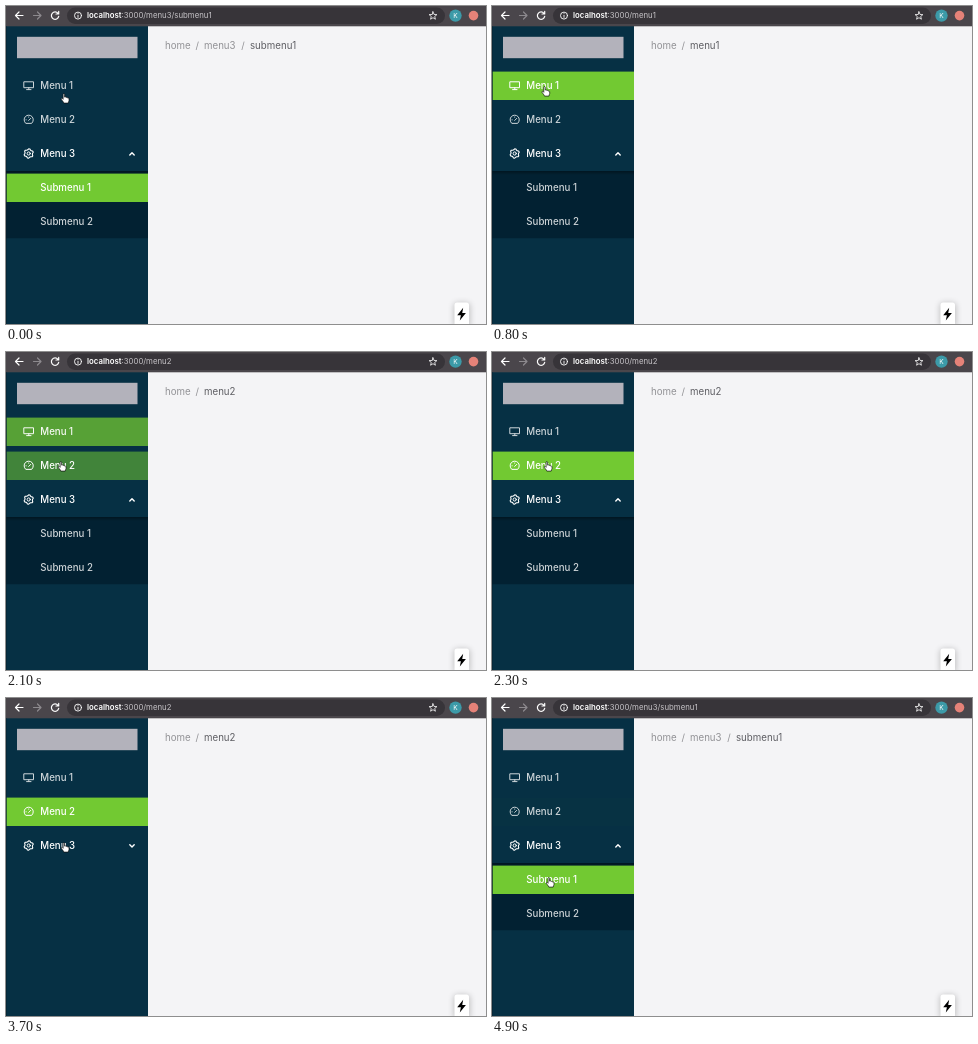
Recreate the animation shown at these times as an HTML page. Size 480 by 318 pixels, loop 5000 ms.

```html
<!DOCTYPE html>
<html lang="en">
<head>
<meta charset="utf-8">
<title>Sidebar menu</title>
<style>
  html, body { margin: 0; width: 100%; height: 100%; overflow: hidden; background: #f4f4f6; }
  svg { display: block; width: 100vw; height: 100vh; }
  text { font-family: Inter, Roboto, sans-serif; white-space: pre; }
  .item { font-size: 9.7px; font-weight: 500; fill: #fff; }
  .crumb { font-size: 9.7px; fill: #929296; }
  .url { font-size: 7.8px; fill: #c6c3c7; }
  .line { fill: none; stroke: #fff; stroke-linecap: round; stroke-linejoin: round; }
</style>
</head>
<body>
<svg viewBox="0 0 480 318">
  <defs>
    <linearGradient id="inset" x2="0" y2="1">
      <stop stop-color="#000" stop-opacity=".35"/>
      <stop offset="1" stop-color="#000" stop-opacity="0"/>
    </linearGradient>
    <filter id="soft" x="-100%" y="-100%" width="300%" height="300%"><feGaussianBlur stdDeviation="3"/></filter>
    <clipPath id="subClip"><rect id="subClipBox" y="165" width="142" height="67.5"/></clipPath>
  </defs>

  <rect width="480" height="318" fill="#f4f4f6"/>
  <rect y="20" width="142" height="298" fill="#063044"/>
  <rect x="11" y="30.8" width="120.5" height="21.4" fill="#b3b2bb"/>

  <!-- browser bar -->
  <rect width="480" height="20.3" fill="#4a464b"/>
  <rect x="61" y="1.5" width="378" height="16.5" rx="8.2" fill="#373439"/>
  <g class="line" stroke-width="1.2">
    <path d="M17 9.5H9.5M13 6L9.5 9.5L13 13"/>
    <path d="M27.5 9.5H35M31.5 6L35 9.5L31.5 13" style="stroke:#8d8a8e"/>
    <path d="M52 7.3A3.7 3.7 0 1 0 52.7 10.4M52.7 5.4V8H50"/>
    <circle cx="72" cy="9.6" r="3.5" stroke-width=".9"/>
    <path d="M72 9.4V11.4M72 7.7V7.8" stroke-width=".9"/>
    <path id="star" stroke-width=".8"/>
  </g>
  <text class="url" x="81" y="12.4"><tspan fill="#fff" font-weight="600">localhost</tspan><tspan id="path"></tspan></text>
  <circle cx="449.5" cy="9.6" r="6.2" fill="#3c9aa8"/>
  <text x="449.5" y="12" font-size="6.6" fill="#fff" text-anchor="middle">K</text>
  <circle cx="467.5" cy="9.6" r="4.8" fill="#e58278"/>

  <text class="crumb" y="43" id="crumbs"></text>

  <!-- sidebar -->
  <g id="top"></g>
  <g class="line">
    <path id="gear" stroke-width="1.1"/>
    <circle cx="22.7" cy="147.5" r="1.6" stroke-width="1"/>
    <path id="chevron" d="M-2.2 1.1L0 -1.1L2.2 1.1" stroke-width="1.4"/>
  </g>
  <text class="item" x="34.3" y="151" font-weight="600">Menu 3</text>
  <g clip-path="url(#subClip)" id="sub">
    <rect y="165" width="142" height="67.5" fill="#022132"/>
    <rect y="165" width="142" height="4" fill="url(#inset)"/>
    <g id="subItems"></g>
  </g>
  <rect y="20" width=".7" height="298" fill="#0a1f2b" opacity=".6"/>

  <!-- badge -->
  <rect x="448" y="297" width="16" height="24" rx="3" fill="#000" opacity=".22" filter="url(#soft)"/>
  <rect x="448.5" y="296.5" width="14.5" height="25" rx="2.5" fill="#fff"/>
  <path d="M457.2 301.8L451.2 309.3H454.9L453.8 314.6L459.9 307H456.2Z" fill="#000"/>

  <path id="hand" d="M-1.9 -4.2C-1.9 -5.1 -.5 -5.1 -.4 -4.2V-1.4C.2 -1.9 1.1 -1.6 1.2 -1C1.9 -1.4 2.6 -1 2.7 -.4C3.4 -.6 4 -.2 4 .5V2C4 3 3.2 3.3 3.2 4.6H-1.2C-1.5 3.3 -3 2 -3.7 .8C-4 .1 -3.2 -.5 -2.6 .1L-1.9 .8Z"
    fill="#fff" stroke="#111" stroke-width=".7" stroke-linejoin="round"/>
</svg>
<script>
const LOOP = 5000, STEP = 100, FADE = 300, GREEN = '#72c932';
// Clicks on Menu 1, Menu 2 and Submenu 1; a button lights up on press, just before release
const CLICK = [400, 1980, 4640], PRESS = 35;
const $ = id => document.getElementById(id);
const clamp = x => Math.min(1, Math.max(0, x));
const ease = x => x < .5 ? 4 * x ** 3 : 1 - 4 * (1 - x) ** 3;
const ramp = (t, start) => ease(clamp((t - start) / FADE));
const pulse = (t, on, off) => ramp(t, on) - ramp(t, off);

// Closed outline whose radius depends on the angle
function polar(cx, cy, count, radius) {
  const points = Array.from({ length: count }, (_, i) => {
    const a = i / count * 2 * Math.PI - Math.PI / 2, r = radius(i);
    return (cx + r * Math.cos(a)).toFixed(2) + ' ' + (cy + r * Math.sin(a)).toFixed(2);
  });
  return 'M' + points.join('L') + 'Z';
}
$('star').setAttribute('d', polar(427, 9.9, 10, i => i % 2 ? 1.8 : 4.1));
$('gear').setAttribute('d', polar(22.7, 147.5, 24, i => i % 4 < 2 ? 4.7 : 3.8));

const monitor = '<path d="M18.2 75.8H27.5V81.7H18.2ZM22.8 81.7V83.6M20.6 83.6H25"/>';
const gauge = '<path d="M19.5 117.1A4.6 4.6 0 1 1 25.9 117.1ZM22.7 114.4L24.7 112.4M20 113.8H20.2M22.7 111V111.2"/>';

// Each item: when it is selected and hovered, as functions of time
const items = [
  { label: 'Menu 1', y: 66, icon: monitor, parent: 'top',
    chosen: t => pulse(t, CLICK[0] - PRESS, CLICK[1]), hover: t => pulse(t, 60, 1360) },
  { label: 'Menu 2', y: 100, icon: gauge, parent: 'top',
    chosen: t => pulse(t, CLICK[1] - PRESS, CLICK[2]), hover: t => pulse(t, 1300, 2560) },
  { label: 'Submenu 1', y: 168, icon: '', parent: 'subItems',
    chosen: t => 1 - pulse(t, CLICK[0], CLICK[2] - PRESS), hover: t => ramp(t, 4260) },
  { label: 'Submenu 2', y: 202, icon: '', parent: 'subItems',
    chosen: () => 0, hover: () => 0 }
];
for (const item of items) {
  const g = document.createElementNS('http://www.w3.org/2000/svg', 'g');
  g.innerHTML = `<rect x=".5" y="${item.y - .4}" width="141.5" height="28.4" fill="${GREEN}"/>
    <g><g class="line" stroke-width="1">${item.icon}</g>
    <text class="item" x="34.3" y="${item.y + 17}">${item.label}</text></g>`;
  $(item.parent).append(g);
  [item.back, item.face] = g.children;
}

// Pointer stops: time, x, y
const stops = [[0, 59, 92.5], [400, 53.7, 85.5], [1250, 53.7, 85.5], [1550, 56, 114.5],
  [2450, 56, 114.5], [2800, 59, 149.5], [4150, 59, 149.5], [4450, 58, 184.5], [LOOP, 58, 184.5]];

function pointerAt(t) {
  const i = stops.findIndex(s => s[0] > t);
  const [t0, x0, y0] = stops[i - 1], [t1, x1, y1] = stops[i];
  const u = clamp((t - t0) / (t1 - t0)), p = u * u * (3 - 2 * u);
  return [x0 + (x1 - x0) * p, y0 + (y1 - y0) * p];
}

const crumbX = [159, 198, 244], slashX = [189.5, 235.2];
let shown = '';
function showRoute(route) {
  if (route === shown) return;
  shown = route;
  $('path').textContent = ':3000/' + route;
  const parts = ['home', ...route.split('/')];
  $('crumbs').innerHTML = parts.map((part, i) => {
    const last = i === parts.length - 1;
    return `<tspan x="${crumbX[i]}"${last ? ' fill="#5e5e63"' : ''}>${part}</tspan>` +
      (last ? '' : `<tspan x="${slashX[i]}">/</tspan>`);
  }).join('');
}

function draw(t) {
  for (const item of items) {
    const chosen = item.chosen(t);
    item.back.setAttribute('opacity', chosen);
    item.face.setAttribute('opacity', .8 + .2 * Math.max(chosen, item.hover(t)));
  }
  showRoute(t < CLICK[0] || t >= CLICK[2] ? 'menu3/submenu1' : t < CLICK[1] ? 'menu1' : 'menu2');

  const open = 1 - pulse(t, 2920, 3860);
  $('subClipBox').setAttribute('height', 67.5 * open);
  $('sub').setAttribute('opacity', open);
  $('chevron').setAttribute('transform', `translate(126 147.8) scale(1 ${2 * open - 1})`);
  $('hand').setAttribute('transform', `translate(${pointerAt(t)})`);
}

function tick() {
  draw(Math.floor(performance.now() % LOOP / STEP) * STEP);
  requestAnimationFrame(tick);
}
tick();
</script>
</body>
</html>
```
